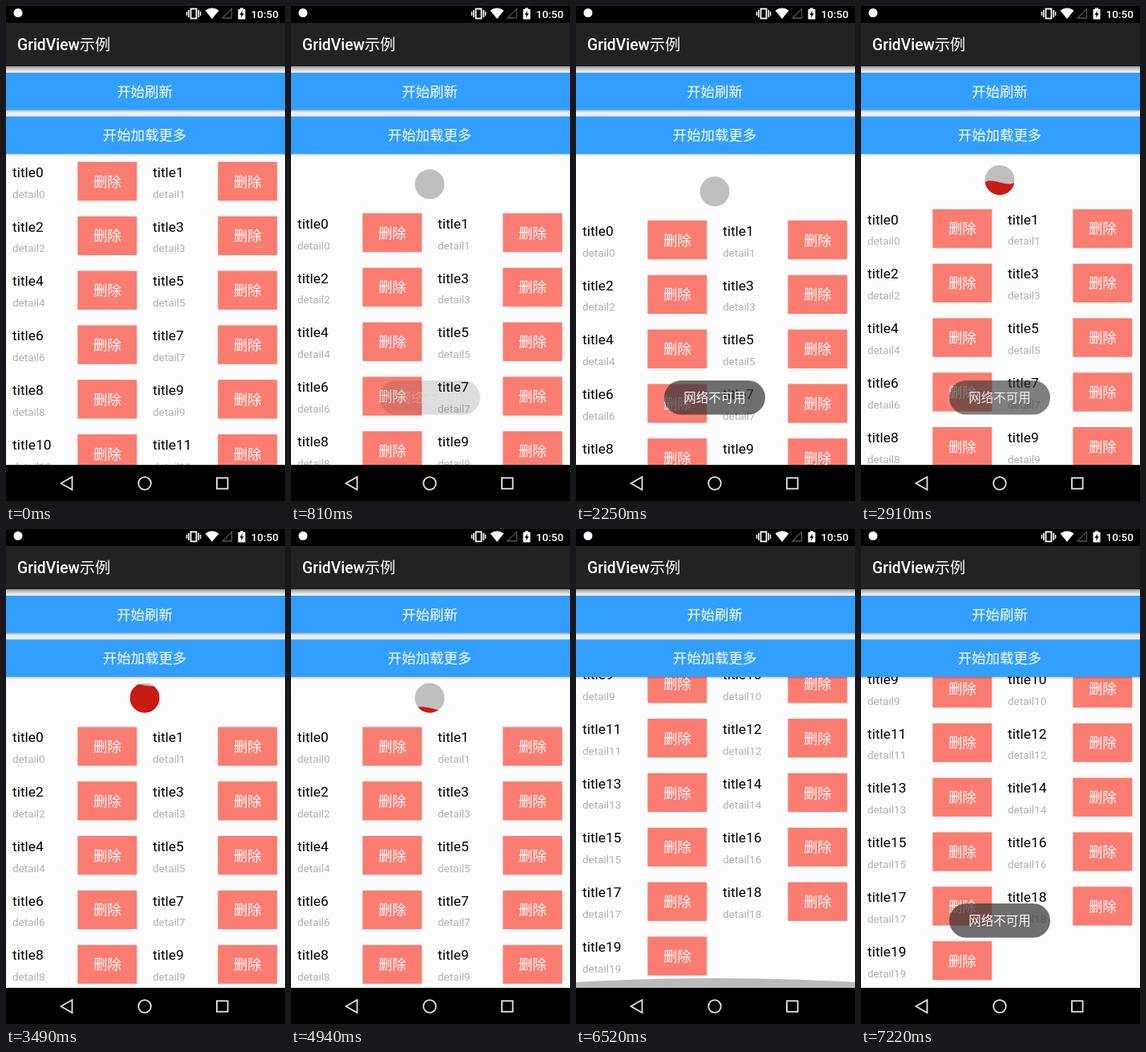
These frames come from a looping animation (348x616 px, 8000 ms). An HTML page with a canvas:

```html
<!DOCTYPE html>
<html lang="zh-CN">
<head>
<meta charset="utf-8">
<title>GridView示例</title>
<style>
html, body { margin: 0; width: 348px; height: 616px; overflow: hidden; background: #000; }
canvas { display: block; }
</style>
</head>
<body>
<canvas width="348" height="616"></canvas>
<script>
const c = document.querySelector('canvas').getContext('2d');
const LOOP = 8000, LIST_TOP = 184, LIST_BOTTOM = 571, ROW = 67.8;
const FONT = 'Roboto, "Noto Sans CJK SC", "Noto Sans CJK", sans-serif';

const oldItems = Array.from({ length: 20 }, (_, i) => ['title' + i, 'detail' + i]);
const newItems = [1, 2, 3, 4, 5].map(i => ['newTitle' + i, 'newDetail' + i]).concat(oldItems);

const linear = x => x;
const smooth = x => (1 - Math.cos(Math.PI * x)) / 2;
const slowDown = x => 1 - (1 - x) ** 2;
const speedUp = x => x * x;

function ramp(t, start, end, ease = linear) {
  return ease(Math.min(1, Math.max(0, (t - start) / (end - start))));
}

function rect(x, y, w, h, color) {
  c.fillStyle = color;
  c.fillRect(x, y, w, h);
}

function text(s, x, y, size, color, weight = 400, align = 'left') {
  c.font = `${weight} ${size}px ${FONT}`;
  c.textAlign = align;
  c.fillStyle = color;
  c.fillText(s, x, y);
}

function label(s, x, y, size = 17.4) {
  text(s, x, y + size * 0.37, size, '#fff', 400, 'center');
}

function shape(points, color, stroke) {
  c.beginPath();
  points.forEach(p => c.lineTo(...p));
  c.closePath();
  if (stroke) {
    c.strokeStyle = color;
    c.lineWidth = stroke;
    c.stroke();
  } else {
    c.fillStyle = color;
    c.fill();
  }
}

function disc(x, y, r, color) {
  c.beginPath();
  c.arc(x, y, r, 0, 7);
  c.fillStyle = color;
  c.fill();
}

function shade(y, h, dark) {
  const g = c.createLinearGradient(0, y, 0, y + h);
  g.addColorStop(0, `rgba(0,0,0,${dark})`);
  g.addColorStop(1, 'rgba(0,0,0,0)');
  rect(0, y, 348, h, g);
}

function statusBar() {
  rect(0, 0, 348, 21, '#000');
  disc(15, 8.5, 5.5, '#fff');
  // vibrate
  c.strokeStyle = '#fff';
  c.lineWidth = 1.8;
  c.strokeRect(230.5, 3.5, 7, 12);
  rect(227, 5, 1.6, 9, '#fff');
  rect(239.5, 5, 1.6, 9, '#fff');
  rect(224.8, 7, 1.4, 5, '#fff');
  rect(241.9, 7, 1.4, 5, '#fff');
  // wifi
  c.beginPath();
  c.moveTo(257, 16);
  c.lineTo(248.5, 5.5);
  c.quadraticCurveTo(257, -0.5, 265.5, 5.5);
  c.fillStyle = '#fff';
  c.fill();
  shape([[270, 15], [281.5, 15], [281.5, 3.5]], '#555', 1.3);
  // battery
  rect(289.5, 4, 9, 12.5, '#fff');
  rect(292, 2.5, 4, 2, '#fff');
  shape([[295, 5.5], [291.5, 11], [293.6, 11], [293, 15], [296.6, 9.3], [294.4, 9.3]], '#000');
  text('10:50', 340, 15, 13.6, '#fff', 500, 'right');
}

function header() {
  rect(0, 75, 348, 109, '#ececec');
  rect(0, 21, 348, 54, '#222');
  text('GridView示例', 14, 55, 19.3, '#fff', 500);
  shade(75, 6, 0.35);
  [['开始刷新', 83], ['开始加载更多', 137.5]].forEach(([s, y]) => {
    rect(0, y, 348, 46.5, '#329fff');
    shade(y + 46.5, 3, 0.22);
    label(s, 173, y + 23.5);
  });
}

function navBar() {
  rect(0, LIST_BOTTOM, 348, 45, '#000');
  shape([[68.5, 594], [82.5, 586], [82.5, 602]], '#e6e6e6', 1.8);
  c.beginPath();
  c.arc(173, 594, 7.8, 0, 7);
  c.stroke();
  c.strokeRect(263, 587.3, 13.6, 13.4);
}

// Badge that fills with a rising wave while refreshing
function badge(t, cy) {
  const size = 37, x = 173 - size / 2, y = cy - size / 2;
  disc(173, cy, size / 2, '#bfbfbf');
  if (t < 2585) return;
  const busy = t < 5445;
  const p = busy ? (t - 2585) % 1165 / 1165 : 0;
  const swing = busy ? Math.abs((t - 2585) / 220 % 2 - 1) : 1;
  const bend = (1 - swing) * size;
  const wave = y + size * (7 / 8 - p * 17 / 16), amp = size * 3 / 16;
  c.save();
  c.beginPath();
  c.arc(173, cy, size / 2, 0, 7);
  c.clip();
  c.beginPath();
  c.moveTo(x, wave);
  c.bezierCurveTo(x + bend / 2, wave - amp, x + (bend + size) / 2, wave + amp, x + size, wave);
  c.lineTo(x + size, y + size * 1.5);
  c.lineTo(x, y + size * 1.5);
  c.fillStyle = '#c91a14';
  c.fill();
  c.restore();
}

function pullAt(t) {
  return 62 * ramp(t, 20, 420, smooth) + 2 * ramp(t, 690, 800)
    + 9 * ramp(t, 2060, 2250) - 20.6 * ramp(t, 2600, 3100, smooth)
    - 52.4 * ramp(t, 5445, 5945, smooth);
}

function scrollAt(t) {
  return 500.3 * ramp(t, 6320, 6510) - 5.7 * ramp(t, 6530, 6680, smooth);
}

function toastAt(t) {
  return ramp(t, 750, 1250, slowDown) - ramp(t, 2740, 3240, speedUp)
    + ramp(t, 6650, 7170, slowDown);
}

function list(t) {
  rect(0, LIST_TOP, 348, LIST_BOTTOM - LIST_TOP, '#fdfdfd');
  const pull = pullAt(t), shift = pull - scrollAt(t);
  if (pull > 0.1) badge(t, 157.8 + pull);
  (t < 5445 ? oldItems : newItems).forEach(([title, detail], i) => {
    const x = i % 2 * 175, y = 194 + (i >> 1) * ROW + shift;
    if (y < 100 || y > LIST_BOTTOM + 10) return;
    text(title, x + 8, y + 18.7, 17.4, '#000');
    text(detail, x + 8, y + 44.5, 13.5, '#b0b0b0');
    rect(x + 89.3, y, 74, 48.3, '#fb7c70');
    label('删除', x + 126.3, y + 24.2);
  });
}

function glow(t) {
  const k = ramp(t, 6470, 6520) - ramp(t, 6520, 7130, slowDown);
  if (k <= 0) return;
  const s = 0.172 * k;
  c.beginPath();
  c.ellipse(174, LIST_BOTTOM + 452 * s, 522, 522 * s, 0, 0, 7);
  c.fillStyle = `rgba(33,33,33,${0.3 * k})`;
  c.fill();
}

function toast(t) {
  const alpha = toastAt(t);
  if (alpha <= 0) return;
  c.globalAlpha = alpha;
  c.beginPath();
  c.roundRect(110, 466, 126, 42.5, 21.2);
  c.fillStyle = 'rgba(50,50,50,.7)';
  c.fill();
  label('网络不可用', 173, 487.3, 15.5);
  c.globalAlpha = 1;
}

function draw(t) {
  c.save();
  c.beginPath();
  c.rect(0, LIST_TOP, 348, LIST_BOTTOM - LIST_TOP);
  c.clip();
  list(t);
  glow(t);
  toast(t);
  c.restore();
  statusBar();
  c.save();
  header();
  c.restore();
  navBar();
}

const begin = performance.now();
function frame() {
  draw((performance.now() - begin) % LOOP);
  requestAnimationFrame(frame);
}
frame();
</script>
</body>
</html>
```
